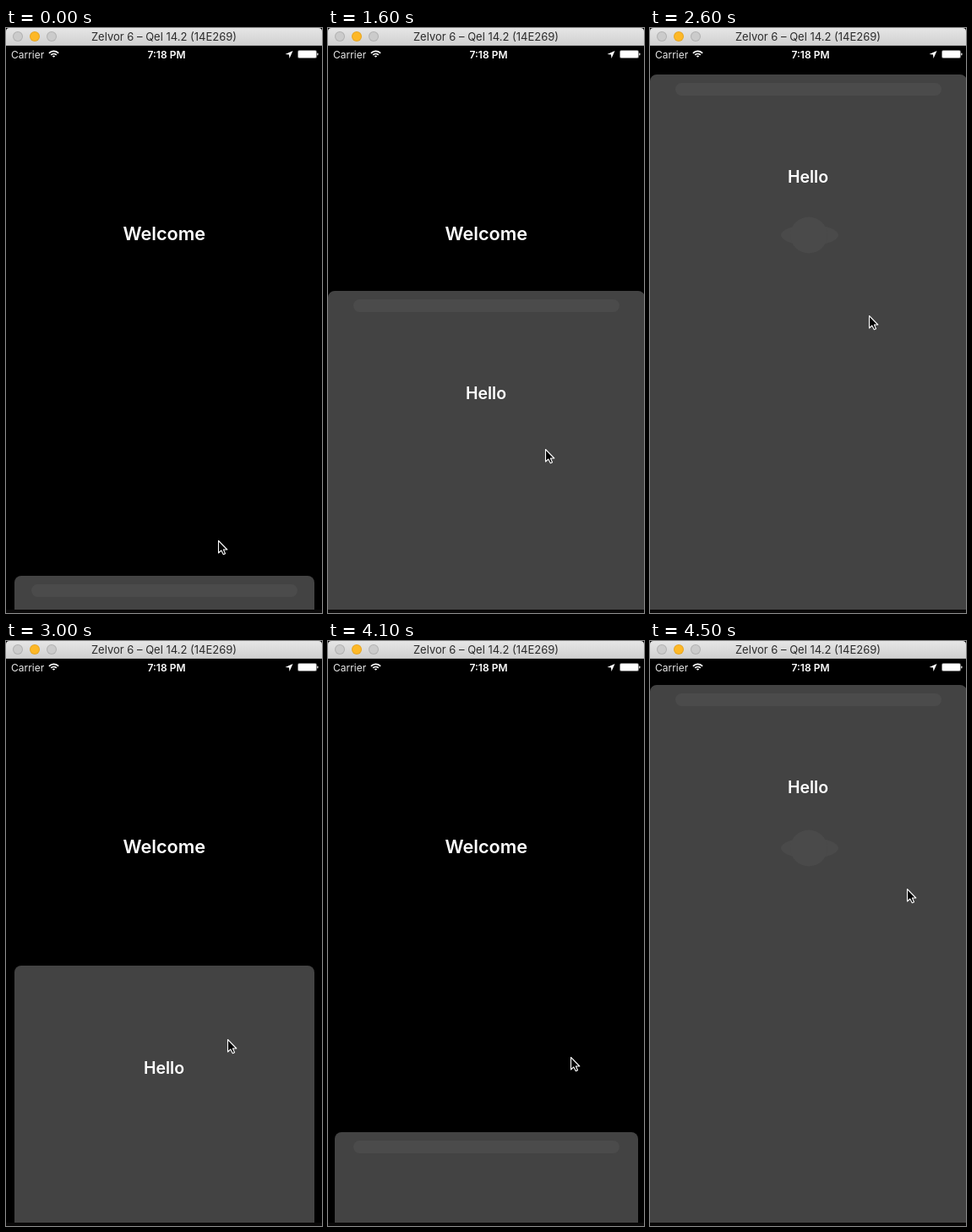
These frames come from a looping animation (374 px wide and 692 px high, 4.6 s). An HTML page with a canvas:

```html
<!DOCTYPE html>
<html lang="en">
<head>
<meta charset="utf-8">
<title>Pull-up card</title>
<style>
  html, body { margin: 0; width: 100%; height: 100%; overflow: hidden; background: #000; }
  canvas { display: block; }
</style>
</head>
<body>
<canvas id="stage" width="374" height="692"></canvas>
<script>
const ctx = document.getElementById('stage').getContext('2d');
const LOOP = 4600, STEP = 100;
const CLOSED = 648, OPEN = 55.5;
const SANS = 'Inter, Roboto, sans-serif';

// Each gesture eases the pointer from where it rests to a new point
const pointerHome = { x: 251, y: 606 };
const gestures = [
  { start: 0, end: 600, x: 246, y: 670 },
  { start: 1400, end: 1600, x: 257, y: 498 },
  { start: 2000, end: 2600, x: 259, y: 340 },
  { start: 2600, end: 3500, x: 266, y: 654 },
  { start: 3800, end: 4227, x: 293, y: 448 },
  { start: 4400, end: 4500, x: 304, y: 293 }
];

// The card springs to its other position after each swipe
const swipes = [
  { start: 1423, from: CLOSED, to: OPEN },
  { start: 2826.5, from: OPEN, to: CLOSED },
  { start: 4042, from: CLOSED, to: OPEN }
];

const clamp = v => Math.min(1, Math.max(0, v));
const mix = (a, b, p) => a + (b - a) * p;
const smooth = p => p * p * (3 - 2 * p);

// Step response of a spring with damping ratio 0.8
function spring(ms) {
  const wt = ms * 0.0095, a = 0.6 * wt;
  return 1 - Math.exp(-0.8 * wt) * (Math.cos(a) + Math.sin(a) * 4 / 3);
}

function cardAt(t) {
  const swipe = swipes.filter(s => t >= s.start).pop();
  if (!swipe) return { top: CLOSED, inset: 10, bar: true };
  const p = spring(t - swipe.start);
  const opening = swipe.to === OPEN;
  const sides = clamp(2 * p);
  return {
    top: Math.floor(mix(swipe.from, swipe.to, p)),
    inset: Math.round(10 * (opening ? 1 - sides : sides)),
    bar: opening || t > swipe.start + 500
  };
}

function pointerAt(t) {
  let { x, y } = pointerHome;
  for (const g of gestures) {
    const p = smooth(clamp((t - g.start) / (g.end - g.start)));
    x = mix(x, g.x, p);
    y = mix(y, g.y, p);
  }
  return [Math.round(x), Math.round(y)];
}

function fillRect(color, x, y, w, h, radius = 0) {
  ctx.fillStyle = color;
  ctx.beginPath();
  ctx.roundRect(x, y, w, h, radius);
  ctx.fill();
}

function fillEllipse(color, x, y, rx, ry = rx) {
  ctx.fillStyle = color;
  ctx.beginPath();
  ctx.ellipse(x, y, rx, ry, 0, 0, 7);
  ctx.fill();
}

function text(label, x, y, font, color = '#fff', align = 'center') {
  ctx.font = font;
  ctx.fillStyle = color;
  ctx.textAlign = align;
  ctx.fillText(label, x, y);
}

function titleBar() {
  const shade = ctx.createLinearGradient(0, 0, 0, 21);
  shade.addColorStop(0, '#e6e6e6');
  shade.addColorStop(1, '#cfcfcf');
  fillRect(shade, 0, 0, 374, 21, [4, 4, 0, 0]);
  fillRect('#b4b4b4', 0, 20, 374, 1);
  for (let i = 0; i < 3; i++) {
    const active = i === 1, x = 14 + 20 * i;
    fillEllipse(active ? '#e6a522' : '#b1b1b1', x, 10, 6);
    fillEllipse(active ? '#fdb827' : '#cbcbcb', x, 10, 5);
  }
  text('Zelvor 6 – Qel 14.2 (14E269)', 187, 15, '13px ' + SANS, '#2b2b2b');
}

function statusBar() {
  text('Carrier', 6, 35.5, '12px ' + SANS, '#e8e8e8', 'left');
  text('7:18 PM', 190, 35.5, '600 12px ' + SANS);

  // Wi-Fi
  ctx.strokeStyle = '#fff';
  ctx.lineWidth = 1.7;
  for (let r = 1.4; r < 8; r += 3.1) {
    ctx.beginPath();
    ctx.arc(56.5, 35, r, -Math.PI * 0.76, -Math.PI * 0.24);
    ctx.stroke();
  }

  // Location arrow
  ctx.fillStyle = '#fff';
  ctx.fill(new Path2D('M339.5 27L335.5 36L335 31.5L330.5 31Z'));

  // Battery
  fillRect('#777', 345, 26, 23, 10, 2.5);
  fillRect('#fff', 346, 27, 21, 8, 1);
  fillRect('#ccc', 368, 29.5, 1.5, 3, 1);
}

function card({ top, inset, bar }) {
  ctx.save();
  ctx.beginPath();
  ctx.rect(0, 21, 374, 667);
  ctx.clip();
  fillRect('#434343', inset, top, 375 - 2 * inset, 720, 8);
  ctx.clip();

  // Blurred heading showing through the card
  fillEllipse('#4a4a4a', 189, 245, 34, 12);
  fillEllipse('#4a4a4a', 188, 245, 22, 21.5);

  if (bar) fillRect('#4b4b4b', 30, top + 10, 315, 15, 7.5);
  text('Hello', 187, top + 127.5, '600 19.5px ' + SANS);
  ctx.restore();
}

const arrow = new Path2D('M0 0V14.5L3.3 11.5L5.8 16.3L8 15.3L5.9 10.5H10.3Z');

function pointer(x, y) {
  ctx.save();
  ctx.translate(x + 0.5, y + 0.5);
  ctx.fillStyle = '#000';
  ctx.strokeStyle = '#fff';
  ctx.lineWidth = 1.1;
  ctx.lineJoin = 'round';
  ctx.fill(arrow);
  ctx.stroke(arrow);
  ctx.restore();
}

function draw(now) {
  const t = Math.floor((now % LOOP) / STEP) * STEP;
  fillRect('#000', 0, 0, 374, 692);
  text('Welcome', 187.3, 250.5, '600 21.7px ' + SANS);
  card(cardAt(t));
  fillRect('#090808', 0, 688, 374, 4);
  titleBar();
  statusBar();
  pointer(...pointerAt(t));
}

let began;
function tick(now) {
  began ??= now;
  draw(now - began);
  requestAnimationFrame(tick);
}
draw(0);
requestAnimationFrame(tick);
</script>
</body>
</html>
```
